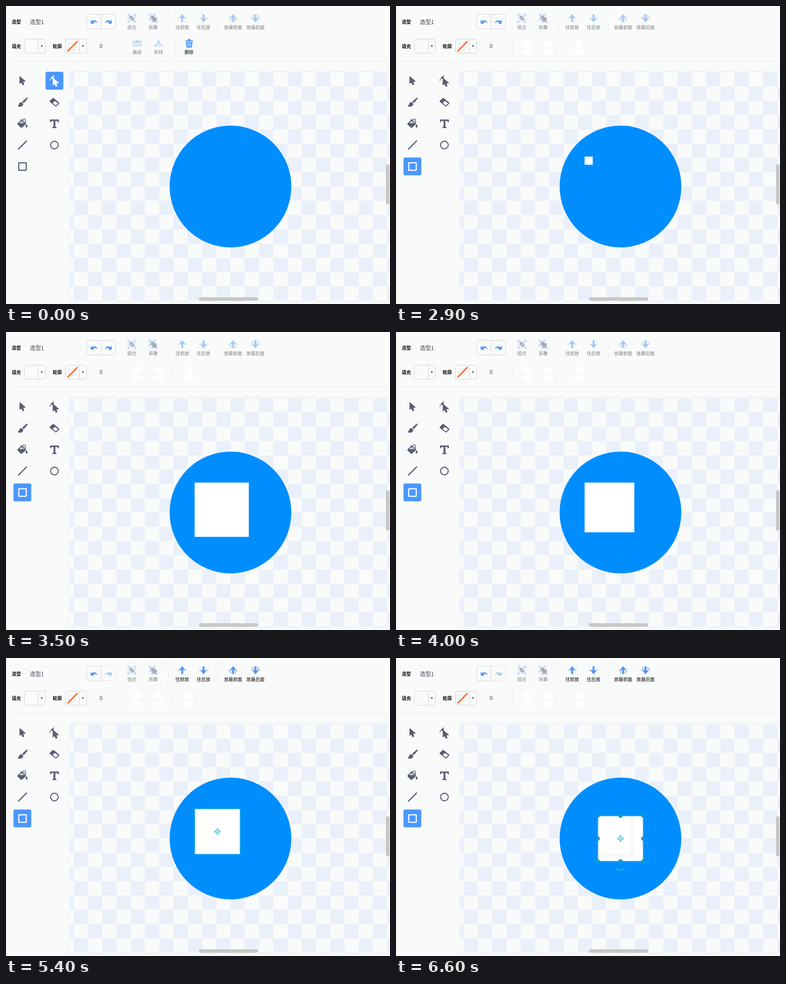
An HTML page for the animation above (8000 ms loop, 850 by 659 pixels).

```html
<!DOCTYPE html>
<html lang="zh">
<head>
<meta charset="utf-8">
<style>
html, body { margin: 0; width: 100%; height: 100%; overflow: hidden; background: #f9fafa; }
svg { display: block; width: 850px; height: 659px; }
text { font-family: "Noto Sans CJK SC", "Noto Sans CJK", "Noto Sans", sans-serif; font-size: 10px; }
.mid { text-anchor: middle; }
.bold { font-weight: 700; }
.field { font-size: 12.2px; fill: #40434d; }
.box { fill: none; stroke: #cdd1d6; }
.pill { fill: none; stroke: #f3f5f6; }
.dash { stroke: #d9dadb; stroke-dasharray: 2 2; }
.blue { fill: #4c97ff; }
.off { opacity: .5; }
.ghost, .ghost * { fill: #fff; }
.ghost text { stroke: #fff; stroke-width: 1.6; }
</style>
</head>
<body>
<svg viewBox="0 0 850 659" xmlns="http://www.w3.org/2000/svg">
  <defs>
    <pattern id="checks" x="497" y="399" width="63.1" height="63.1" patternUnits="userSpaceOnUse">
      <path d="M0 0h31.55v31.55H0zM31.55 31.55h31.55v31.55H31.55z" fill="#eaf0f9"/>
    </pattern>
    <clipPath id="squareClip"><rect id="clipRect" width="101" height="101"/></clipPath>
    <path id="undoArrow" d="M187.5 30.5V39H196L193.4 36.4C196 34.4 199.5 34.6 202.8 38.6C201.6 32.2 194.8 29.6 190.4 33.4Z"/>
    <path id="upArrow" d="M0-9L6.3-1.5Q6.4-.5 5.5-.5H2.2V7.5Q2.2 8.7 0 8.7T-2.2 7.5V-.5H-5.5Q-6.4-.5-6.3-1.5Z" fill="#4c97ff"/>
    <path id="pointer" d="M30.5 156V171.2L34.2 168.3L37 174.4L39.8 173.1L37.1 167.1L43 166.6Z" stroke-width="1.2" stroke-linejoin="round"/>
    <path id="caret" d="M-2.5-1.7H2.5L0 2Z" fill="#444"/>
    <g id="trash">
      <path d="M398 76H402.5V74.4Q402.5 73 404 73H407Q408.5 73 408.5 74.4V76H413Q414 76 414 77V78.6H397V77Q397 76 398 76Z"/>
      <path d="M398.3 80H412.7L411.7 90.5Q411.5 92 410 92H401Q399.5 92 399.3 90.5Z"/>
    </g>
  </defs>
  <rect width="850" height="659" fill="#f9fafa"/>
  <path d="M.5 0V659" stroke="#dcdddd"/>

  <rect class="pill" x="41.5" y="19.5" width="125" height="31" rx="15.5"/>
  <rect class="pill" x="184.500" y="73.500" width="64" height="31" rx="15.5"/>
  <g class="bold">
    <text x="13" y="38.800">造型</text><text x="13" y="92.800">填充</text><text x="103.500" y="92.800">轮廓</text>
  </g>
  <text class="field" x="53" y="39.500">造型1</text>
  <text class="field" x="207" y="93.300">0</text>

  <path class="box" d="M210.5 18.500H182.500Q178.500 18.500 178.500 22.500V46.500Q178.500 50.500 182.500 50.500H210.500Z"/>
  <use href="#undoArrow" class="blue"/>
  <g id="redo">
    <path class="box" d="M210.5 18.500H238.500Q242.500 18.500 242.500 22.500V46.500Q242.500 50.500 238.500 50.500H210.500"/>
    <use href="#undoArrow" class="blue" transform="matrix(-1 0 0 1 421.500 0)"/>
  </g>

  <g class="off">
    <path d="M272 19.500H285M272 34.500H285M271 21V33M286 21V33" stroke="#4c97ff" stroke-dasharray="3 1.500"/>
    <g fill="#f9fafa" stroke="#4c97ff">
      <path d="M269.500 17.500h3.500v3.500h-3.500zM284.500 17.500h3.500v3.500h-3.500zM269.500 33h3.500v3.500h-3.500zM284.500 33h3.500v3.500h-3.500z"/>
      <path d="M316.500 17.500h3.500v3.500h-3.500zM327.500 17.500h3.500v3.500h-3.500zM316.500 28h3.500v3.500h-3.500zM321.500 33.500h3.500v3.500h-3.500zM332 33.500h3.500v3.500h-3.500z"/>
      <path d="M320 19.500H327M318.500 21V28M325 35.500H332M333.500 24V33" fill="none" stroke-dasharray="3 1.500"/>
    </g>
    <path d="M273.500 22H280.500V25H283.500V32H276.500V29H273.500Z" fill="#575e75"/>
    <path d="M277.500 26H280V28.500H277.500Z" fill="#f9fafa"/>
    <rect x="320.500" y="21.500" width="7.500" height="7.500" fill="#575e75"/>
    <circle cx="328.500" cy="29.500" r="5.300" fill="#575e75"/>
    <text class="mid" x="278.500" y="50.800">组合</text><text class="mid" x="326" y="50.800">拆散</text>
  </g>
  <g id="order"></g>

  <g class="box">
    <rect x="40.500" y="73.500" width="47" height="31" rx="4"/><path d="M71.500 74V104"/>
    <rect x="131.500" y="73.500" width="47" height="31" rx="4"/><path d="M162.500 74V104"/>
    <rect x="139.500" y="82.500" width="14" height="14" stroke="#dfe1e4"/>
  </g>
  <path d="M137 99.500L157.500 78.500" stroke="#ff6428" stroke-width="3" stroke-linecap="round"/>
  <use href="#caret" x="79.300" y="88.700"/><use href="#caret" x="170.300" y="88.700"/>

  <path class="dash" d="M13 121.500H850M358.500 12V58M469.500 12V58M257.500 67V112" fill="none"/>

  <g id="ghostRow" class="ghost">
    <path d="M280 90V81L285 79L288 74H292L295 79L300 81V90ZM327 90V85L333 80L335 75H339L341 80L347 85V90Z"/>
    <use href="#trash"/>
    <text class="mid" x="290" y="105.500">曲线</text><text class="mid" x="337.500" y="105.500">折线</text><text class="mid" x="405" y="105.500">删除</text>
    <rect x="373.500" y="67" width="1" height="45"/>
  </g>
  <g id="editRow">
    <path class="dash" d="M374.500 67V112"/>
    <g class="off">
      <path d="M281 90Q282 78 290 78T299 90ZM328 90L337.500 79L347 90Z" fill="#4c97ff" opacity=".35"/>
      <path d="M281 89.500Q282 78 290 78T299 89.500M281 78H299M328 89L337.500 79L347 89" fill="none" stroke="#4c97ff" stroke-width="1.200"/>
      <g class="blue"><circle cx="290" cy="78" r="2.300"/><circle cx="281" cy="78" r="1.600"/><circle cx="299" cy="78" r="1.600"/><circle cx="337.500" cy="78.500" r="2.300"/></g>
      <text class="mid" x="290" y="105.500">曲线</text><text class="mid" x="337.500" y="105.500">折线</text>
    </g>
    <use href="#trash" class="blue"/>
    <path d="M402.200 82V89.500M405.500 82V89.500M408.800 82V89.500" stroke="#f9fafa" stroke-width="1.300"/>
    <text class="mid" x="405" y="105.500">删除</text>
  </g>

  <rect id="reshapeButton" class="blue" x="87.500" y="145.500" width="39.500" height="39.500" rx="4"/>
  <rect id="rectButton" x="16.500" y="335" width="39.500" height="39.500" rx="4"/>
  <g fill="#575e75" stroke="#575e75" stroke-width="0">
    <use href="#pointer"/>
    <path d="M47.600 202.600Q48.300 204 46.800 206.200L39.500 214.800L35.800 211.600L44.500 203.900Q46.600 202.200 47.600 202.600ZM34.600 212.800L38.300 216Q38.300 220.500 33.500 222.200Q28.500 223.800 25 220.500Q27.800 220.500 28.800 217.200Q30.300 212.600 34.600 212.800Z"/>
    <path d="M97 209.500L103 204Q104.500 202.800 106 204L117.500 213.500Q118.800 214.800 117.500 216.200L112 221.500Q110.500 222.800 109 221.500L97 212Q95.800 210.800 97 209.500Z"/>
    <path d="M103.300 214.500L108 210L115.500 215L110.500 220Z" fill="#f9fafa"/>
    <path d="M26.500 258.500L35.500 250.500L44 258.500V261.500L35.500 269Q34 270 32.500 268.800L26 262.500Q24.500 260.500 26.500 258.500ZM45.500 261Q48.500 265.500 47.400 267.800Q45.700 270 43.800 267.800Q42.800 265 45.500 261Z"/>
    <path d="M29.500 258.800L36 253.300L41.500 258.800Z" fill="#f9fafa"/>
    <path d="M32 251L38.500 258M36.500 251.500Q41.500 247.500 43 251.500L43.500 257" fill="none" stroke-width="1.600"/>
    <path d="M97.500 251H117V257H114.800Q114.400 254 112.500 254H109.300V266.500Q109.300 267.800 111.800 268V270H102.500V268Q105.200 267.800 105.200 266.500V254H102Q100.100 254 99.700 257H97.500Z"/>
    <path d="M27.500 316.500L45.500 298.500" stroke-width="2.500" stroke-linecap="round"/>
    <circle cx="107.200" cy="307.500" r="8.500" fill="none" stroke-width="2.300"/>
  </g>
  <g id="reshapeIcon" stroke-width="0">
    <use href="#pointer" x="73.500" y="3.500"/>
    <path d="M97 165.500Q97.500 159 103 158.500Q105.500 157 105 152.500" fill="none" stroke-width="1.300"/>
    <circle cx="103" cy="158.500" r="2.800"/>
  </g>
  <rect id="rectIcon" x="28.200" y="346.700" width="16.600" height="16.600" rx=".5" fill="none" stroke-width="2.500"/>

  <path d="M850 143.500H142.500Q139.500 143.500 139.500 146.500V652.500Q139.500 655.500 142.500 655.500H850" fill="none" stroke="#eef0f1"/>
  <rect x="141.500" y="144.500" width="708.500" height="509.500" fill="url(#checks)"/>
  <circle cx="496.900" cy="399.100" r="134.700" fill="#008eff"/>

  <rect id="square" fill="#fff"/>
  <g id="trace" clip-path="url(#squareClip)" fill="#f9f9f9">
    <path d="M518 333H527V442H417V433H518Z"/>
    <path d="M466.500 377.500h3v5h5v3h-5v5h-3v-5h-5v-3h5z"/>
  </g>
  <g id="selection">
    <rect width="101" height="101" fill="none" stroke="#1aa5e8" stroke-width="2"/>
    <path d="M49.200 44.500h2.600v4.700h4.700v2.600h-4.700v4.700h-2.600v-4.700h-4.700v-2.600h4.700z" fill="#fff" stroke="#1aa5e8" stroke-width="1.200"/>
    <g id="handles"></g>
  </g>

  <rect x="427" y="644" width="131" height="8" rx="4" fill="#c8c8c8"/>
  <rect x="841" y="350" width="8" height="89" rx="4" fill="#c8c8c8"/>
</svg>
<script>
const LOOP = 8000, STEP = 100;
const HOME = { x: 417.5, y: 333 }, SIDE = 101, SHIFT = { x: 29, y: 15.5 };
const GROW = [18, 38, 60, 82, 100, 112, 120, 124, 125];
const SHRINK = [123, 117, 110, 106, 103.5, 102, 101];
const DRAG = [0, .25, .6, .88, 1];
const BLUE = '#4c97ff', DARK = '#575e75';

const el = id => document.getElementById(id);
const set = (id, attrs) => {
  for (const name in attrs) el(id).setAttribute(name, attrs[name]);
};
const show = (id, on) => set(id, { visibility: on ? 'visible' : 'hidden' });

// Layer-order buttons: centre, direction of the arrow, side lines, label
const orderButton = ([x, dir, lines, label]) => {
  const sides = Array.from({ length: lines }, (_, i) => {
    const outer = 10.5 - 2 * i, inner = i || dir < 0 ? 3.8 : 5;
    return `M${-outer} ${i * 3.2}H${-inner}M${inner} ${i * 3.2}H${outer}`;
  }).join('');
  return `<g transform="translate(${x} 27) scale(1 ${dir})">
      <path d="${sides}" stroke="${DARK}" stroke-width="1.2" opacity=".75"/>
      <use href="#upArrow"/></g>
    <text class="mid" x="${x}" y="50.8">${label}</text>`;
};
el('order').innerHTML = [
  [390, 1, 1, '往前放'], [437.3, -1, 1, '往后放'],
  [502.7, 1, 3, '放最前面'], [552.3, -1, 3, '放最后面']
].map(orderButton).join('');

const knobs = [];
for (const x of [0, .5, 1]) for (const y of [0, .5, 1]) {
  if (x !== .5 || y !== .5) {
    knobs.push(`<circle cx="${x * SIDE}" cy="${y * SIDE}" r="4.3" fill="#0d9fe0" stroke="#1680bd" stroke-width="1"/>`);
  }
}
el('handles').innerHTML = `
  <path d="M50.500 101V118" stroke="#1aa5e8"/>
  <path d="M44 118Q50.500 124 57 118" fill="none" stroke="#1aa5e8" stroke-width="3"/>
  <path d="M41 122.500V116H47.500ZM60 122.500V116H53.500Z" fill="#1aa5e8"/>` + knobs.join('');

const pick = (list, start, t) =>
  list[Math.max(0, Math.min(list.length - 1, Math.floor((t - start) / STEP)))];

function draw(t) {
  const chosen = t >= 1600, settled = t >= 1700, released = t >= 5000;

  set('reshapeButton', { opacity: settled ? 0 : chosen ? .5 : 1 });
  set('reshapeIcon', { fill: chosen ? DARK : '#fff', stroke: chosen ? DARK : '#fff' });
  set('rectButton', { fill: chosen ? BLUE : t >= 1500 ? '#e1ecfe' : 'none' });
  set('rectIcon', { stroke: chosen ? '#fff' : DARK });
  show('editRow', !chosen);
  show('ghostRow', chosen);
  set('order', { opacity: released ? 1 : .5 });
  set('redo', { opacity: released ? .5 : 1 });

  const side = t < 3800 ? pick(GROW, 2900, t) : pick(SHRINK, 3800, t);
  const moved = pick(DRAG, 5400, t);
  const x = HOME.x + SHIFT.x * moved, y = HOME.y + SHIFT.y * moved;
  show('square', t >= 2900);
  set('square', { x, y, width: side, height: side });
  set('clipRect', { x, y });
  show('trace', moved > 0);
  set('selection', { transform: `translate(${x} ${y + .3})` });
  show('selection', released);
  show('handles', released && (t < 5400 || t >= 6600));
}

const begin = performance.now();
function tick() {
  draw((performance.now() - begin) % LOOP);
  requestAnimationFrame(tick);
}
tick();
</script>
</body>
</html>
```
